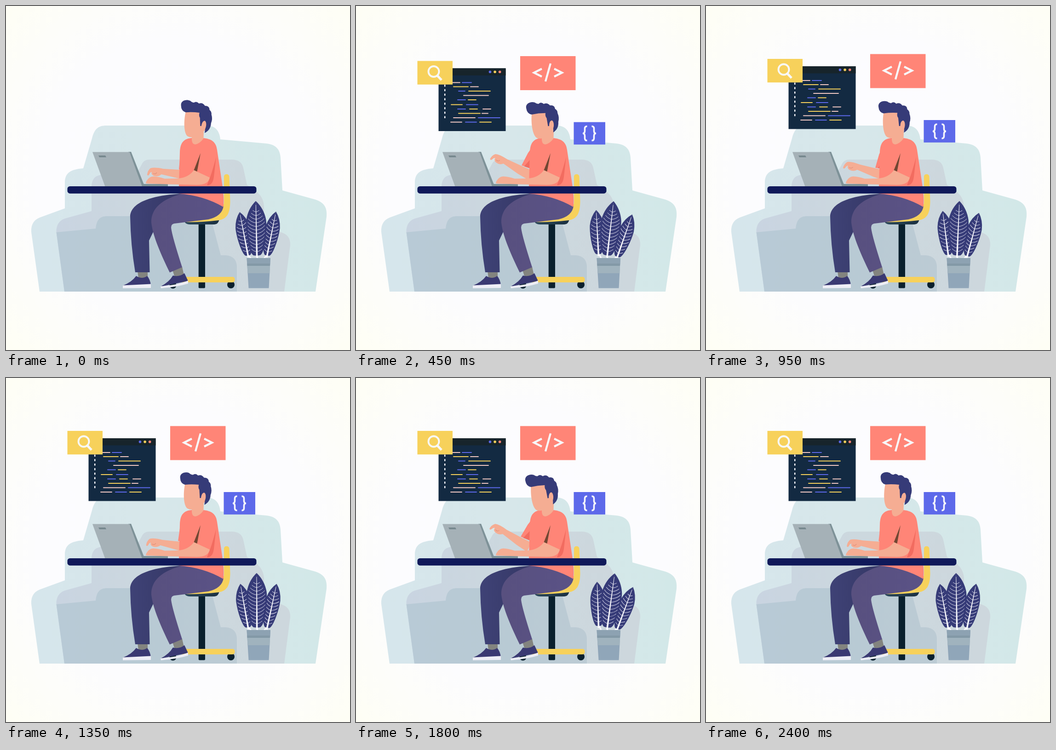
These frames come from a looping animation (748 by 748 pixels, 2.45 s). An HTML page with a canvas:

```html
<!DOCTYPE html>
<html lang="en">
<head>
<meta charset="utf-8">
<title>Coding at a desk</title>
<style>
html, body { margin: 0; width: 100%; height: 100%; overflow: hidden; background: #fdfdfb; }
canvas { display: block; width: 748px; height: 748px; }
</style>
</head>
<body>
<canvas id="stage" width="748" height="748"></canvas>
<script>
const ctx = document.getElementById('stage').getContext('2d');
const STEP = 50, LOOP = 2450, SWING = 1250;
const NAVY = '#363b78', SKIN = '#f5ad93', CORAL = '#ff8577', SHADE = '#f26c60',
      YELLOW = '#f7d15b', BLUE = '#5d69ea', PINK = '#f3c9c4', INK = '#0a202d', WHITE = '#f8f8fc';

const fill = (path, color) => { ctx.fillStyle = color; ctx.fill(new Path2D(path)); };
const line = (path, color, width, cap = 'butt') => {
  Object.assign(ctx, { strokeStyle: color, lineWidth: width, lineCap: cap });
  ctx.stroke(new Path2D(path));
};
const box = (x, y, w, h, color, r = 0) => {
  ctx.fillStyle = color;
  ctx.beginPath();
  ctx.roundRect(x, y, w, h, r);
  ctx.fill();
};
const dot = (x, y, r, color) => {
  ctx.fillStyle = color;
  ctx.beginPath();
  ctx.arc(x, y, r, 0, Math.PI * 2);
  ctx.fill();
};
const blend = (x0, y0, x1, y1, ...colors) => {
  const g = ctx.createLinearGradient(x0, y0, x1, y1);
  colors.forEach((c, i) => g.addColorStop(i / (colors.length - 1), c));
  return g;
};
const turned = (x, y, degrees, draw) => {
  ctx.save();
  ctx.translate(x, y);
  ctx.rotate(degrees * Math.PI / 180);
  ctx.translate(-x, -y);
  draw();
  ctx.restore();
};

function backdrop() {
  const g = ctx.createRadialGradient(374, 374, 120, 374, 374, 520);
  g.addColorStop(0, '#fcfcff');
  g.addColorStop(0.45, '#fcfcfe');
  g.addColorStop(1, '#fefef5');
  ctx.fillStyle = g;
  ctx.fillRect(0, 0, 748, 748);
}

function sofa() {
  fill('M73 621 L55.5 495 C53 475 61 464 76 459 L128 440 V384 C128 364 139 355 168 353 L187 288 C192 268 200 260 218 260 H436 C454 260 464 270 466 290 L566 299 C586 301 596 311 597 330 L601 401 L673 421 C691 427 699 438 697 458 L673 621 Z',
    blend(60, 560, 690, 400, '#d6e6ec', '#d7e7ea', '#d2e8e8'));
  fill('M127 621 L109.5 492 C109 474 118 464 132 461 L186 446 V392 C187 374 196 367 212 367 H283 L297 341 Q302 334 311 334 H491 Q512 334 516 352 L524 389 C546 403 559 412 561 434 V478 L598 492 Q619 498 618 520 L605 621 Z',
    blend(110, 520, 610, 440, '#c9d4e1', '#ccd8de', '#cdd7dd'));
  fill('M127 621 L109.5 492 L195 484 C197 465 204 457 220 457 H437 Q446 458 449 474 L467 542 H478 Q501 544 502 566 V621 Z',
    blend(110, 540, 502, 540, '#b8cad6', '#b8cad4', '#bccbd4'));
}

// Each row: y, then [start, end, color] for every dash of code.
const CODE = [
  [162, [207, 226, PINK], [231, 251, BLUE]],
  [171, [212, 244, YELLOW], [249, 266, PINK]],
  [180.5, [223, 237, BLUE], [245, 292, YELLOW]],
  [190, [234, 288, PINK]],
  [199.5, [221, 238, BLUE], [244, 261, YELLOW]],
  [210, [207, 231, YELLOW], [240, 265, BLUE]],
  [219.5, [221, 238, BLUE], [247, 264, YELLOW], [276, 293, PINK]],
  [229, [223, 270, YELLOW], [274, 287, PINK]],
  [238.5, [212, 259, PINK], [266, 313, BLUE]],
  [248, [206, 230, PINK], [238, 262, BLUE], [269, 294, YELLOW]]
];

function cards(ms) {
  const left = Math.max(0, 1 - ms / 800);
  ctx.save();
  ctx.globalAlpha = Math.min(1, ms / 300);
  ctx.translate(0, 54 * left ** 3);

  box(179.5, 131, 146, 136.5, '#132a42');
  box(179.5, 131, 146, 15.5, '#17242b');
  [BLUE, YELLOW, CORAL].forEach((c, i) => dot(291.5 + i * 10.6, 138.8, 2.8, c));
  for (const [y, ...dashes] of CODE)
    for (const [a, b, color] of dashes) line(`M${a} ${y} H${b}`, color, 1.9, 'round');
  ctx.setLineDash([4.5, 5.3]);
  line('M193.2 166.5 V240', WHITE, 2.5);
  ctx.setLineDash([]);

  box(133.5, 115, 76.5, 51.3, YELLOW);
  line('M180.5 138 A11.5 11.5 0 1 1 157.500 138 A11.5 11.5 0 1 1 180.5 138', WHITE, 3.8);
  line('M176.5 146.5 L186 156.500', WHITE, 5);

  box(357, 104.5, 120.5, 74, CORAL);
  line('M404 132 L387 140.500 L404 149 M431 132 L448 140.500 L431 149', WHITE, 4.3);
  line('M423 120.500 L412 159.500', WHITE, 4.3);

  box(473.5, 248, 68.5, 48.7, BLUE);
  const brace = 'Q497.5 257 497.5 262 V267 Q497.5 272.5 493 272.5 Q497.5 272.5 497.5 278 V283 Q497.500 288 502.500 288';
  line('M502.5 257 ' + brace, WHITE, 3.6);
  ctx.translate(1015, 0);
  ctx.scale(-1, 1);
  line('M502.5 257 ' + brace, WHITE, 3.6);
  ctx.restore();
}

function leaf(x, y, tipX, tipY, w) {
  const len = Math.hypot(tipX - x, tipY - y);
  ctx.save();
  ctx.translate(x, y);
  ctx.rotate(Math.atan2(tipX - x, y - tipY));
  const half = s => `C${s * w * .85} -6 ${s * w * 1.12} ${-len * .45} ${s * w} ${-len * .65} Q${s * w * .8} ${-len * .86} 0 ${-len}`;
  const side = s => `M0 2 L${s * w * .35} 1 ${half(s)} Z`;
  fill(side(-1), NAVY);
  fill(side(1), NAVY);
  fill(`M-1.9 6 L-.4 ${-len * .93} H.4 L1.900 6 Z`, WHITE);
  const count = Math.round(len / 10);
  for (let i = 0; i < count; i++) {
    const k = (i + .8) / (count + .8), v = k * len * .86;
    const reach = w * .86 * Math.min(1, .55 + k * 1.2, (1.08 - k) * 2.4);
    for (const s of [-1, 1])
      line(`M0 ${-v} Q${s * reach * .65} ${-v - 2} ${s * reach} ${-v - reach * .55}`, '#e4e4f2', .95);
  }
  ctx.restore();
}

function plant(sway) {
  turned(548, 548, 9.2 * sway, () => {
    line('M526 540 L533 550 M545 540 L547 550 M567 540 L561 550', WHITE, 3.2);
    leaf(526, 541, 508, 448, 15.5);
    leaf(568, 541, 587, 447, 15.5);
    leaf(545.5, 541, 543, 424, 21.5);
  });
  fill('M523.5 548 H575 L571.500 613.500 H527.500 Z', '#90a6b9');
  fill('M523.5 548 H575 L574.300 560 H524.200 Z', '#8da2b2');
  fill('M524.2 560 H574.300 L574 565 H524.500 Z', '#8399a7');
  fill('M524.5 565 H574 L573.200 581 H525.500 Z', '#a0b3be');
}

function chair() {
  dot(489, 606, 8, INK);
  dot(363, 607, 7.5, INK);
  box(418.7, 470, 14.3, 143.5, INK, 2);
  box(380, 589, 117.5, 12, YELLOW, 5);
  fill('M388 468 L464 463 Q462 475 453 475 H400 Q390 475 388 468 Z', blend(388, 0, 464, 0, '#2c4a5c', '#1b3041'));
  fill('M474 371 C474 364 485 364 485.500 371 L487.500 425 C487 451 481 463 462 466 Q430 470 394 470 Q388 470 386 466 L440 440 L474 430 Z', YELLOW);
}

function farArm(lift) {
  turned(390, 309, 25 * lift, () => {
    fill('M402 357 L376 356 L342 354 Q322 350 314 353 Q308 358 307 367 Q309 371 312 366 Q313 362 317 361 Q315 367 322 369.5 Q331 372 338 366 L376 375 L402 379 Z', SKIN);
    line('M320 364 Q325 367 328 362', '#de8c76', 1);
    fill('M386 296 L379 325 L376 355 L403 354 L406 310 Z', CORAL);
    fill('M382 355 L393 324 L403 354 Z', SHADE);
  });
}

function legs() {
  fill('M286 577 H308 V591 H288 Z M362 574 L383 567 L387 585 L367 590 Z', '#83847f');
  fill('M254 608 Q274 600 283 587 Q296 595 307 587 Q314 595 315 608 Z', '#3a3972');
  fill('M254 607.500 L315 604.500 V613 L254 613.800 Z', '#eeeef6');
  fill('M336 610 Q355 600 363 586 Q376 590 388 581 L396 598 Z', '#3a3972');
  fill('M336 609.500 Q372 607 396 597 V603.500 Q372 611 337 613.800 Z', '#eeeef6');
  fill('M384 408 C320 411 271 426 270 458 Q271 520 281 579 H312.500 L311 510 L345 440 Z', blend(270, 0, 345, 0, '#3f4276', '#383b6b'));
  fill('M384 408 C340 419 315 440 316 471 C319 500 337 540 356 579.500 L383 568 Q361 500 359 482 Q359 474 366 473 L440 464 Q470 457 473 435 L440 407 Z',
    blend(316, 0, 473, 0, '#58507f', '#5a5286'));
}

function torso() {
  fill('M403 287 C386 289 379 297 378 318 L375.500 408 Q430 412 472.500 437 Q475 420 470 386 L459 313 C457 295 446 289 429 287 Z', CORAL);
  fill('M404 274 V290 Q404 300 411 301 Q421 300 429.500 288 L430 270 Z', SKIN);
  fill('M457 328 Q451 351 446 366 L437 390 Q450 390 452 371 Z', SHADE);
  fill('M423 320 L408.500 357 L415.500 360 Z', '#714733');
}

function nearArm() {
  fill('M408.5 357 L443 373 Q440 389 415 389 L350 387.500 L305 386 Q303 384 306 380 Q311 371 320 370.500 Q332 371 345 375.500 L374 375 Q397 373 408.500 357 Z', SKIN);
}

function head(tilt) {
  turned(422, 297, -10 * tilt, () => {
    fill('M391 230 C386 252 387 277 395 283 Q407 290 420 277 L434 270 V231 Z', SKIN);
    fill('M381 216 C380 205 393 202 401 206 Q405 210 409 210 Q415 206 420 212 Q428 209 433 217 Q443 217 443 226 Q448 230 447 236 Q450 246 446 255 Q445 270 432 276 L435 255 Q434 250 429 251 Q426 254 425 261 L422.500 261 L422 243 Q419 239 421 232 Q406 230 391 231 Q381 228 381 216 Z', NAVY);
    ctx.fillStyle = SKIN;
    ctx.beginPath();
    ctx.ellipse(430.5, 260, 4.8, 10.5, .16, 0, Math.PI * 2);
    ctx.fill();
  });
}

function laptop() {
  fill('M266 317 H272 L299.500 387 H352 V392.500 H290 Z', '#7e9298');
  fill('M188 317.500 H268.500 L296 392.500 H215.500 Z', '#a5b1b7');
  fill('M201 325 H216 L218 329 H203 Z', '#77898f');
}

function render(ms) {
  const phase = (ms + STEP / 2) / SWING % 1;
  const swing = (1 - Math.cos(phase * Math.PI * 2)) / 2;
  const ramp = 1 - Math.abs(1 - 2 * phase);
  backdrop();
  sofa();
  cards(ms);
  chair();
  farArm(swing);
  legs();
  torso();
  head(.35 * swing + .65 * ramp);
  laptop();
  nearArm();
  box(133.5, 392, 411, 15.7, '#10195a', 5.5);
  plant(swing);
}

const start = performance.now();
function tick() {
  const ms = (performance.now() - start) % LOOP;
  render(Math.floor(ms / STEP) * STEP);
  requestAnimationFrame(tick);
}
tick();
</script>
</body>
</html>
```
